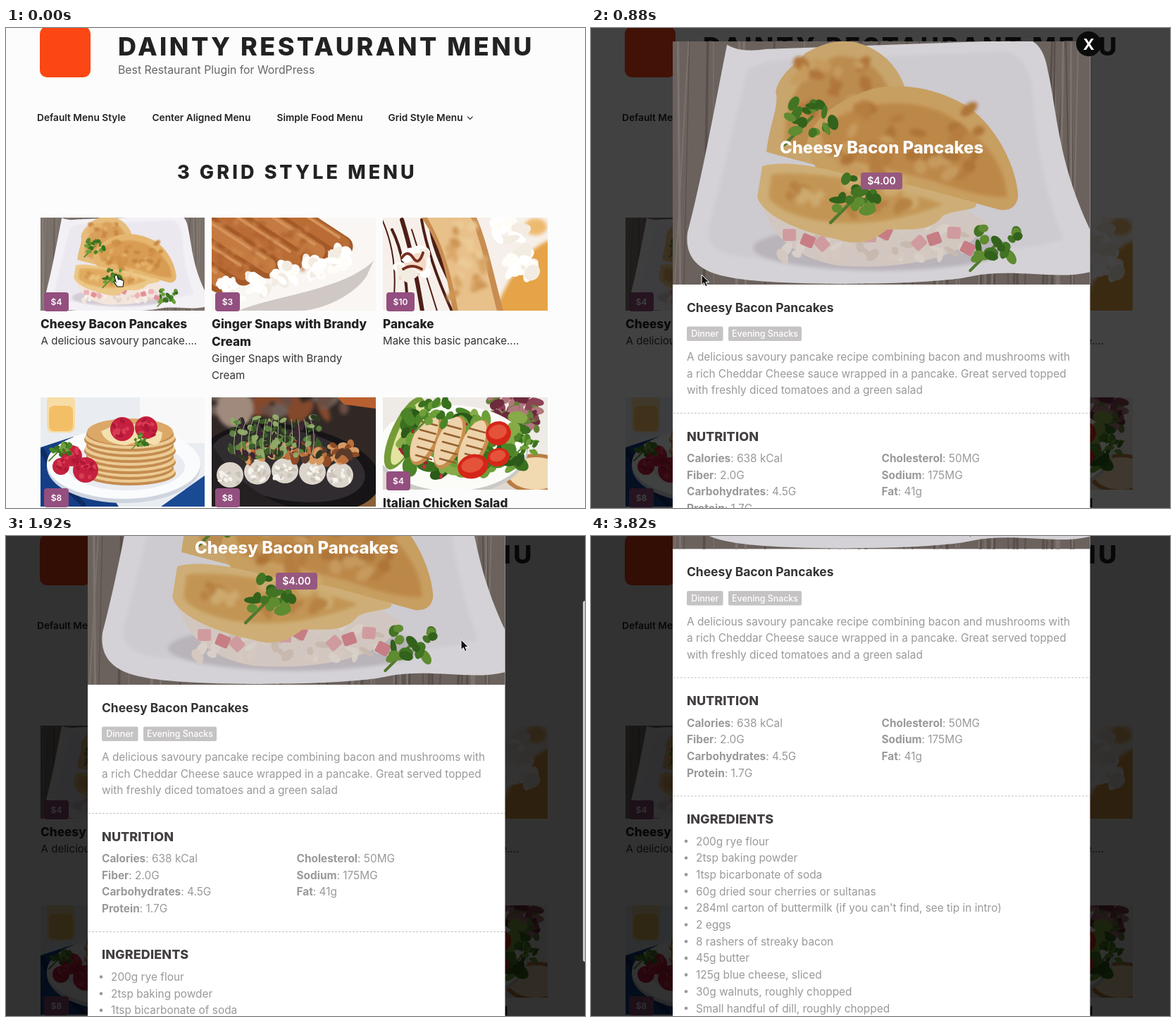
Animation of 822x681 px, one loop 3.97 s. Source, as an HTML page:

```html
<!DOCTYPE html>
<html lang="en">
<head>
<meta charset="utf-8">
<title>Restaurant menu</title>
<style>
  html, body { margin: 0; width: 100%; height: 100%; overflow: hidden; background: #fcfcfc; }
  svg { display: block; }
  text { font-family: Inter, "Open Sans", sans-serif; white-space: pre; }
  .mid { text-anchor: middle; }
</style>
</head>
<body>
<svg id="stage" width="822" height="681" viewBox="0 0 822 681"></svg>
<script>
const LOOP = 3970;
const stage = document.getElementById('stage');

let seed = 7;
const random = () => (seed = seed * 16807 % 2147483647) / 2147483647;
const repeat = (n, make) => Array.from({ length: n }, (_, i) => make(i)).join('');

// Drawing helpers
const text = (x, y, size, weight, fill, str, extra = '') =>
  `<text x="${x}" y="${y}" font-size="${size}" font-weight="${weight}" fill="${fill}" ${extra}>${str}</text>`;
const rect = (x, y, w, h, fill, rx = 0) =>
  `<rect x="${x}" y="${y}" width="${w}" height="${h}" rx="${rx}" fill="${fill}"/>`;
const oval = (x, y, rx, ry, fill, turn = 0) =>
  `<ellipse cx="${x}" cy="${y}" rx="${rx}" ry="${ry}" fill="${fill}" transform="rotate(${turn} ${x} ${y})"/>`;
const shape = (d, fill) => `<path d="${d}" fill="${fill}"/>`;
const stroke = (d, color, width) =>
  `<path d="${d}" fill="none" stroke="${color}" stroke-width="${width}" stroke-linecap="round"/>`;
const scatter = (n, x, y, w, h, r, colors) => repeat(n, i =>
  oval(x + (random() - .5) * w, y + (random() - .5) * h, r * (.6 + random() * .7),
    r * (.4 + random() * .4), colors[i % colors.length], random() * 180));
const soft = body => `<g filter="url(#soft)">${body}</g>`;
const photo = (x, y, w, h, body, box = [x, y, w, h]) =>
  `<svg x="${x}" y="${y}" width="${w}" height="${h}" viewBox="${box.join(' ')}" preserveAspectRatio="xMidYMid slice">${body}</svg>`;
const badge = (x, y, w, str) =>
  rect(x, y, w, 27, '#934f7f', 4) + text(x + w / 2, y + 18, 12, 600, '#fff', str, 'class="mid"');

const defs = '<defs><filter id="soft"><feGaussianBlur stdDeviation="2.5"/></filter></defs>';
const greens = ['#4c8528', '#6d9f38', '#39701f'];
const creams = ['#fffdf8', '#f3ece2', '#fff'];
const sprig = (x, y, r) => stroke(`M${x} ${y}l${-r} ${r}`, '#5d8a35', r / 9) + scatter(18, x, y, r * 1.6, r * 1.2, r / 4, greens);

// Pictures
const savoury =
  rect(116, 19, 592, 345, '#7b716b') +
  repeat(46, () => {
    const x = 90 + random() * 640;
    return stroke(`M${x} 19l${-20 + random() * 30} 345`, random() < .5 ? '#655b56' : '#8f847e', 1 + random() * 3);
  }) +
  shape('M193 24Q212 36 250 30L622 17Q642 24 648 60C660 110 662 190 708 286V346C660 358 600 340 540 352C480 366 260 366 200 354Q130 344 137 290C158 210 172 130 193 24Z', '#f3f1f6') +
  soft(shape('M222 60Q240 48 270 46L590 34Q620 40 626 90C632 180 650 250 670 300C600 322 300 342 200 322Q160 312 168 280C190 200 205 130 222 60Z', '#ebe8ef') +
    oval(410, 312, 180, 32, '#d4cdd6')) +
  shape('M249 176C252 140 268 110 262 90C268 65 290 52 304 36C325 24 345 17 368 19C410 26 436 55 446 86L340 200Z', '#e6bd7c') +
  soft(shape('M275 160C275 95 305 55 350 40C395 40 415 65 425 95L340 190Z', '#d8a05a') +
    scatter(16, 340, 85, 100, 70, 12, ['#ca8742', '#e4b16b'])) +
  shape('M304 170C312 130 345 104 400 86C450 76 500 90 535 112C578 142 604 200 606 238Q604 260 580 258L530 244L320 200Z', '#e5b66f') +
  soft(shape('M325 150C350 108 450 90 510 126C560 156 590 200 590 240C550 240 510 225 480 215L335 180Z', '#d89c53') +
    scatter(34, 455, 160, 200, 100, 13, ['#c88640', '#e3b06a', '#d0914a'])) +
  shape('M240 240C250 280 272 322 350 337C430 343 540 330 560 275L520 250Z', '#f1e5dc') +
  scatter(44, 400, 303, 270, 52, 9, ['#f8eee6', '#e6d4c9', '#f3e6dc']) +
  repeat(10, i => `<rect x="${272 + i * 29}" y="${285 + i % 3 * 11 - i * 2}" width="19" height="17" rx="3" fill="${i % 2 ? '#e58f98' : '#efb2b6'}" transform="rotate(${i * 23} ${282 + i * 29} 295)"/>`) +
  shape('M243 196C290 184 350 206 384 212C440 216 500 236 546 248C552 260 520 256 500 266C480 292 450 284 420 286C400 302 380 310 350 300C300 290 245 268 236 240Z', '#ecc888') +
  soft(shape('M256 208C320 200 430 225 500 250C455 268 400 280 345 276C300 272 262 258 252 240Z', '#e0ab60') +
    scatter(24, 360, 242, 190, 46, 11, ['#d2954d', '#eac27e'])) +
  sprig(314, 126, 40) + sprig(380, 236, 40) + sprig(576, 306, 38);

const snaps =
  rect(292, 269, 233, 132, '#f9f6f3') +
  shape('M330 401C380 380 480 372 522 330L512 352C490 385 440 401 420 401Z', '#cfc8c4') +
  repeat(6, i => {
    const k = 5 - i, x = 308 + k * 35, y = 368 - k * 10;
    return stroke(`M${x - 150} ${y - 102}L${x - 6} ${y - 8}`, '#a45a28', 31) +
      stroke(`M${x - 150} ${y - 105}L${x - 6} ${y - 11}`, i % 2 ? '#c47a40' : '#ba6c35', 22) +
      stroke(`M${x - 150} ${y - 112}L${x - 10} ${y - 21}`, '#d4935a', 4);
  }) +
  soft(scatter(70, 365, 310, 140, 70, 4, ['#a95d29', '#d08a4d'])) +
  repeat(5, i => scatter(12, 318 + i * 39, 371 - i * 11, 24, 28, 10, creams));

const dessert =
  rect(535, 269, 234, 132, '#f7f0ea') +
  soft(shape('M775 300C740 310 715 350 690 410H775Z', '#e6a347') + oval(752, 282, 16, 12, '#edbb70')) +
  repeat(6, i => stroke(`M${534 + i * 14} ${272 + i % 2 * 14}Q${560 + i * 10} 330 ${548 + i * 22} 408`, '#4d1e17', 2 + i % 3 * 2)) +
  scatter(18, 577, 335, 38, 38, 12, [...creams, '#f3d9c6']) +
  stroke('M562 326q8-12 16 0t14-7M564 342q12-8 26 0', '#79301f', 4) +
  shape('M590 269H668C682 300 690 340 706 401H634C626 350 618 310 590 269Z', '#c88d50') +
  shape('M598 269H660C674 300 684 350 697 401H642C632 350 622 310 598 269Z', '#e8c08a') +
  soft(scatter(32, 655, 335, 50, 110, 8, ['#d9a768', '#eccb97', '#cd9552'])) +
  repeat(2, i => scatter(18, 712 + i * 20, 287 + i * 46, 36, 30, 13, creams));

const berry = (x, y, r) => oval(x, y, r, r, '#c5203f') + scatter(14, x, y, r * 1.4, r * 1.4, r / 4, ['#d83c55', '#b01736']);
const stack =
  rect(49, 524, 233, 155, '#e9edf1') + rect(190, 524, 92, 65, '#f8f8f9') +
  shape('M49 595L95 580L160 679H49Z', '#143f86') + shape('M220 679L282 635V679Z', '#194a94') +
  stroke('M52 600Q70 640 110 676', '#0c2c62', 7) +
  rect(58, 522, 40, 52, '#f8dca6', 8) + rect(61, 536, 34, 36, '#f3bf66', 7) +
  oval(167, 622, 109, 52, '#ced5df') + oval(167, 618, 109, 50, '#fafbfd') + oval(170, 622, 84, 34, '#e9ebf0') +
  repeat(8, i => oval(176, 632 - i * 8, 65 - i % 2 * 3, 17, '#c48c50') + oval(176, 629 - i * 8, 64 - i % 2 * 3, 16, '#eccb94')) +
  oval(176, 573, 61, 19, '#dba868') + shape('M135 572Q176 550 222 574Q220 596 205 590T170 592Q140 590 135 572Z', '#f4dfae') +
  berry(165, 569, 17) + berry(199, 567, 16) + sprig(192, 584, 13) +
  berry(93, 607, 15) + berry(78, 622, 12) + berry(113, 627, 18) + sprig(78, 597, 17);

const sushi =
  rect(292, 524, 233, 155, '#312826') +
  soft(scatter(20, 390, 532, 190, 24, 16, ['#6a4e43', '#84492c', '#6d5f58']) + oval(325, 540, 26, 28, '#a08a7d')) +
  shape('M470 524H525V540L480 534Z', '#b86030') +
  shape('M292 665L340 650L525 660V679H292Z', '#8a6038') +
  oval(405, 625, 128, 61, '#161416', 10) + oval(400, 620, 111, 50, '#302c2f', 10) +
  shape('M292 590Q330 655 400 679H292Z', '#241f20') +
  repeat(5, i => oval(318 + i * 39, 634 - Math.sin(i * .8) * 6, 19, 18, '#dcd5cb') +
    scatter(14, 318 + i * 39, 636 - Math.sin(i * .8) * 6, 28, 20, 4, ['#f6f2ec', '#cbc3b9'])) +
  scatter(80, 415, 602, 160, 26, 8, ['#b96f3c', '#d69a62', '#8f4a26', '#5a3a2a']) +
  scatter(130, 382, 580, 125, 56, 6, ['#3d5a2a', '#5e8340', '#3a2533', '#2c3a22', '#8fa866']) +
  repeat(12, i => stroke(`M${325 + i * 10} 605q${i - 5}-30 ${8 - i}-50`, '#a3b088', 1));

const tomato = (x, y, rx, ry) => oval(x, y, rx, ry, '#d42618', -15) + oval(x - 1, y - 2, rx * .72, ry * .6, '#e5523a', -15);
const salad =
  rect(535, 524, 234, 131, '#eeeae6') + rect(535, 605, 234, 50, '#dfd8d1') +
  oval(752, 632, 46, 28, '#b87d42') + oval(752, 632, 39, 23, '#f1d9b2') +
  scatter(70, 720, 545, 70, 50, 8, ['#8c4354', '#b0777c', '#65803a', '#6d2b3e']) +
  oval(633, 600, 108, 63, '#cbcac6') + oval(633, 596, 106, 61, '#fbfbf8') +
  oval(566, 575, 19, 56, '#759b38', 25) + oval(570, 575, 13, 49, '#e2e4a0', 25) +
  scatter(120, 650, 588, 165, 86, 13, [...greens, '#86ab48', '#2c5a1a']) +
  scatter(24, 610, 600, 130, 80, 4, ['#a71d32', '#c73240']) +
  repeat(3, i => {
    const x = 596 + i * 34, y = 583 + i * 5;
    return oval(x, y, 18, 40, '#c88d4d', 24) + oval(x - 2, y - 2, 15, 37, '#edd2aa', 24) +
      repeat(5, j => stroke(`M${x - 14 + j * 2} ${y + 23 - j * 12}l22 6`, '#96602f', 2.5));
  }) +
  tomato(699, 575, 18, 17) + tomato(663, 622, 22, 17) + tomato(699, 609, 16, 13) + sprig(608, 545, 28) + sprig(738, 590, 22);

// Page
const ink = '#222';
const dishTitle = (x, y, str) => text(x, y, 17.2, 800, ink, str);
const dishNote = (x, y, str) => text(x, y, 15.1, 400, '#333', str);
const savouryBox = [116, 19, 592, 345];

const page =
  rect(0, 0, 822, 681, '#fcfcfc') +
  rect(48, -2, 72, 72, '#fb4714', 10) +
  text(159, 39, 36, 800, ink, 'DAINTY RESTAURANT MENU', 'letter-spacing="3.5"') +
  text(159, 65, 15.8, 400, '#666', 'Best Restaurant Plugin for WordPress') +
  [[44, 'Default Menu Style'], [207.5, 'Center Aligned Menu'], [384.5, 'Simple Food Menu'], [542.5, 'Grid Style Menu']]
    .map(([x, str]) => text(x, 132, 13.7, 600, ink, str)).join('') +
  stroke('M655.5 126l3.3 3.3l3.3-3.3', '#333', 1.2) +
  text(243, 213.5, 27, 800, ink, '3 GRID STYLE MENU', 'letter-spacing="4.1"') +
  photo(49, 269, 233, 132, savoury, savouryBox) + photo(292, 269, 233, 132, snaps) + photo(535, 269, 234, 132, dessert) +
  photo(49, 524, 233, 155, stack) + photo(292, 524, 233, 155, sushi) + photo(535, 524, 234, 131, salad) +
  badge(54, 375, 35, '$4') + badge(297, 375, 35, '$3') + badge(540, 375, 40, '$10') +
  badge(54, 653, 35, '$8') + badge(297, 653, 35, '$8') + badge(540, 629, 34, '$4') +
  dishTitle(49, 426, 'Cheesy Bacon Pancakes') + dishNote(49.5, 449, 'A delicious savoury pancake....') +
  dishTitle(292, 426, 'Ginger Snaps with Brandy') + dishTitle(292, 451, 'Cream') +
  dishNote(292, 474, 'Ginger Snaps with Brandy') + dishNote(292, 497.5, 'Cream') +
  dishTitle(535, 426, 'Pancake') + dishNote(535, 449, 'Make this basic pancake....') +
  dishTitle(535, 680, 'Italian Chicken Salad');

const loading =
  `<g opacity=".8">${rect(44, 162, 725, 519, '#fff')}</g>` +
  rect(44, 91, 725, 1, '#e4e4e4') + rect(44, 161, 725, 1, '#e4e4e4') +
  '<g id="spinner">' + repeat(12, k =>
    `<ellipse cx="412.5" cy="322" rx="6" ry="12" fill="#2b2b2b" opacity="${1 - k / 11}" transform="rotate(${330 - k * 30} 412.5 362)"/>`) + '</g>';

// Dialog
const grey = '#999';
const ingredients = ['200g rye flour', '2tsp baking powder', '1tsp bicarbonate of soda', '60g dried sour cherries or sultanas',
  "284ml carton of buttermilk (if you can't find, see tip in intro)", '2 eggs', '8 rashers of streaky bacon', '45g butter',
  '125g blue cheese, sliced', '30g walnuts, roughly chopped', 'Small handful of dill, roughly chopped'];
const facts = [['Calories', '638 kCal'], ['Fiber', '2.0G'], ['Carbohydrates', '4.5G'], ['Protein', '1.7G'],
  ['Cholesterol', '50MG'], ['Sodium', '175MG'], ['Fat', '41g']];
const story = ['A delicious savoury pancake recipe combining bacon and mushrooms with',
  'a rich Cheddar Cheese sauce wrapped in a pancake. Great served topped', 'with freshly diced tomatoes and a green salad'];
const body = (x, y, str) => text(x, y, 15.4, 400, grey, str);
const heading = (y, str) => text(136, y, 18, 800, '#444041', str, 'letter-spacing=".1"');
const divider = y => `<path d="M117 ${y}H708" stroke="#c4c4c4" stroke-dasharray="3 2"/>`;
const tag = (x, w, str) => rect(x, 423.5, w, 20.5, '#c5c3c4', 2) + text(x + w / 2, 438, 12.4, 500, '#fff', str, 'class="mid"');

const dialog =
  rect(116, 19, 592.5, 1200, '#fff', 3) +
  photo(116, 19, 592.5, 345, savoury, savouryBox) +
  `<g opacity=".13">${rect(116, 19, 592.5, 345, '#000')}</g>` +
  text(412.5, 177.5, 23.9, 800, '#fff', 'Cheesy Bacon Pancakes', 'class="mid"') +
  rect(383, 205, 59, 24, '#96587f', 4) + text(412.5, 222, 14, 600, '#fff', '$4.00', 'class="mid"') +
  '<circle cx="706.5" cy="22.5" r="17.7" fill="#0b0b0b"/>' + text(706.5, 30.5, 22, 700, '#fff', 'X', 'class="mid"') +
  text(136, 402.5, 17.4, 700, '#333', 'Cheesy Bacon Pancakes') +
  tag(136, 51.5, 'Dinner') + tag(195, 104, 'Evening Snacks') +
  story.map((str, i) => body(136, 472 + i * 23.7, str)).join('') +
  divider(546.5) + heading(585.5, 'NUTRITION') +
  facts.map(([name, value], i) =>
    body(i < 4 ? 136 : 412.5, 616 + i % 4 * 23.7, `<tspan font-weight="700">${name}</tspan>: ${value}`)).join('') +
  divider(714.5) + heading(753, 'INGREDIENTS') +
  ingredients.map((str, i) => oval(135, 778.5 + i * 23.7, 2.3, 2.3, grey) + body(149, 784 + i * 23.7, str)).join('');

const cursors =
  `<g id="arrow"><path d="M0 0V14.5L3.3 11.5L5.6 16.7L8.2 15.6L6 10.5H10.6Z" fill="#111" stroke="#fff" stroke-width="1"/></g>` +
  `<g id="hand"><path d="M2 1Q4-1 5 2L6.5 7Q8 5 9 7Q11 6 11.5 8Q14 7 14 10L13 17H5L0 10Q1 8 3 10L1 3Z" fill="#fff" stroke="#111" stroke-width="1.1" transform="translate(-1 0)"/></g>` +
  `<g id="beam"><path d="M-3 0Q0 0 0 2Q0 0 3 0M0 2V12M-3 14Q0 14 0 12Q0 14 3 14M-2 9H2" fill="none" stroke="#222" stroke-width="1.3"/></g>`;

stage.innerHTML = defs + page + `<g id="loading">${loading}</g>` +
  '<rect id="shade" width="822" height="681"/>' + `<g id="dialog">${dialog}</g>` +
  '<rect id="thumb" x="819" width="6" height="512" rx="3" fill="#c9c9c9"/>' + cursors;

// Timelines: [start, ...values]
const cursorSteps = [
  [0, 'hand', 154, 350], [440, 'arrow', 157, 350], [1030, 'arrow', 514, 289], [1180, 'arrow', 540, 284],
  [1330, 'arrow', 646, 147], [2070, 'beam', 646, 141.5], [2960, 'none', 0, 0], [3260, 'arrow', 810, 610],
  [3380, 'arrow', 796, 629], [3520, 'arrow', 791, 667], [3670, 'arrow', 790, 677], [3820, 'none', 0, 0]];
const scrollSteps = [[0, 0, null], [1780, 45, 26], [1920, 153, 92], [2070, 290, 186], [2220, 345.5, 224], [2810, 345.5, null]];
const spinSteps = [[0, 0], [590, 60], [740, 120]];
const shadeSteps = [[0, 0], [880, .74], [1030, .8]];

const current = (steps, t) => steps.findLast(step => step[0] <= t).slice(1);
const part = id => document.getElementById(id);
const show = (id, visible) => part(id).setAttribute('display', visible ? 'inline' : 'none');

function render(t) {
  const [kind, x, y] = current(cursorSteps, t);
  const [scroll, thumbTop] = current(scrollSteps, t);
  show('loading', t >= 440 && t < 880);
  show('dialog', t >= 880);
  show('thumb', thumbTop !== null);
  part('spinner').setAttribute('transform', `rotate(${current(spinSteps, t)} 412.5 362)`);
  part('shade').setAttribute('opacity', current(shadeSteps, t)[0]);
  part('dialog').setAttribute('transform', `translate(0 ${-scroll})`);
  part('thumb').setAttribute('y', thumbTop ?? 0);
  for (const id of ['arrow', 'hand', 'beam']) {
    show(id, id === kind);
    part(id).setAttribute('transform', `translate(${x} ${y})`);
  }
}

function tick() {
  render(performance.now() % LOOP);
  requestAnimationFrame(tick);
}
tick();
</script>
</body>
</html>
```
